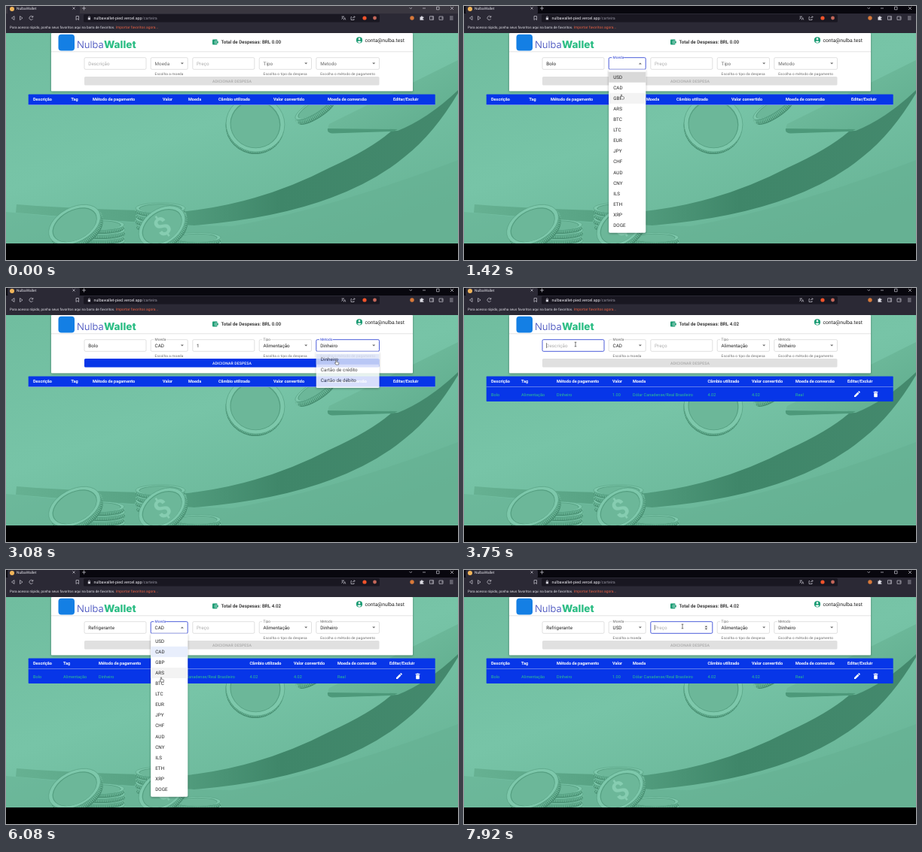
An HTML page that plays this animation: 600 by 338 pixels, repeating every 8000 ms.

```html
<!DOCTYPE html>
<html lang="pt-BR">
<head>
<meta charset="utf-8">
<title>NulbaWallet</title>
<style>
html, body { margin: 0; width: 100%; height: 100%; overflow: hidden; background: #000; }
svg { display: block; width: 100vw; height: 100vh; }
text { font-family: Roboto, sans-serif; text-rendering: geometricPrecision; white-space: pre; }
.icon { fill: none; stroke: #c9c8d2; stroke-width: .7; }
</style>
</head>
<body>
<svg viewBox="0 0 600 338">
  <defs>
    <linearGradient id="sky" x2=".7" y2="1">
      <stop offset="0" stop-color="#70bd9f"/><stop offset=".5" stop-color="#77c4a7"/><stop offset="1" stop-color="#68b496"/>
    </linearGradient>
    <linearGradient id="shaft" x2="1">
      <stop offset="0" stop-color="#66b192"/><stop offset=".35" stop-color="#549f80"/>
      <stop offset=".6" stop-color="#3f8669"/><stop offset="1" stop-color="#44896d"/>
    </linearGradient>
    <linearGradient id="head" y2="1">
      <stop offset="0" stop-color="#77c2a4"/><stop offset="1" stop-color="#5fac8d"/>
    </linearGradient>
    <clipPath id="page"><rect y="36" width="600" height="280"/></clipPath>
    <filter id="lift" x="-10%" y="-10%" width="120%" height="125%">
      <feDropShadow dx="0" dy="1" stdDeviation="1.4" flood-opacity=".35"/>
    </filter>
  </defs>
  <g id="backdrop" clip-path="url(#page)"></g>
  <rect id="strip" width="600" height="10"/>
  <g id="browser"></g>
  <g id="app"></g>
  <g id="pointer"></g>
</svg>
<script>
const LOOP = 8000, BLUE = '#0736e8', FOCUS = '#2b3fd2';
const $ = id => document.getElementById(id);

const text = (x, y, s, size = 6.25, fill = '#222', more = '') =>
  `<text x="${x}" y="${y}" font-size="${size}" fill="${fill}" ${more}>${s}</text>`;
const rect = (x, y, w, h, fill, more = '') =>
  `<rect x="${x}" y="${y}" width="${w}" height="${h}" fill="${fill}" ${more}/>`;
const path = (d, fill, more = '') => `<path d="${d}" fill="${fill}" ${more}/>`;
const dot = (x, y, r, fill) => `<circle cx="${x}" cy="${y}" r="${r}" fill="${fill}"/>`;
const icon = d => `<path class="icon" d="${d}"/>`;

// ---------- backdrop ----------
function coin(x, y, rx, ry, tilt, depth, mark = '') {
  const disc = (dy, k, fill, more = '') => `<ellipse cy="${dy}" rx="${rx * k}" ry="${ry * k}" fill="${fill}" ${more}/>`;
  return `<g transform="translate(${x} ${y}) rotate(${tilt})">` +
    disc(depth, 1, '#468d70') +
    disc(depth / 2, .98, '#549f81', `stroke="#6db899" stroke-width="${depth * .7}" stroke-dasharray="1.2 1.2"`) +
    disc(0, 1, '#7dc8ab', 'stroke="#569f82" stroke-width=".6"') +
    disc(.3, .86, '#559f81') + disc(.8, .83, '#6cb799') +
    text(0, ry * .55, mark, ry * 1.5, '#86cdb1', 'text-anchor="middle" font-weight="700"') + '</g>';
}
function stack(x, y, rx, ry, count) {
  let out = '';
  for (let i = count; i--;) out += coin(x + (i % 2), y + i * 7, rx, ry, 0, 5);
  return out;
}
$('backdrop').innerHTML =
  rect(0, 36, 600, 281, 'url(#sky)') +
  path('M0 274Q180 292 300 293Q430 270 600 205V317H0Z', '#64b092', 'opacity=".5"') +
  path('M14 264Q120 272 240 273Q340 262 430 215Q485 190 512 166L600 100V116Q568 170 530 200Q440 276 250 292Q150 287 13 275Z', 'url(#shaft)') +
  path('M429 157L600 72V112Q560 150 520 166L433 169Q425 166 429 157Z', 'url(#head)') +
  path('M427 163Q426 169 433 169.5L514 167L520 164Z', '#4d997a') +
  coin(331, 157, 39, 37, 12, 3) + coin(408, 135, 28, 8, -32, 8) +
  stack(205, 269, 33, 7, 4) + stack(254, 308, 31, 6.5, 2) +
  stack(125, 291, 32, 7, 4) + coin(91, 291, 37, 23, -28, 7) + coin(207, 293, 34, 23, -35, 6, '$');

// ---------- browser window ----------
$('browser').innerHTML =
  rect(0, 10, 600, 26, '#2b2935') +
  rect(2, 0, 96, 10, '#2b2935', 'rx="1.5"') + rect(103, 11, 393, 10.5, '#191721', 'rx="1.6"') +
  dot(8, 4, 3, '#f0b45a') + text(14, 5.2, 'NulbaWallet', 4.9, '#e6e5ec') +
  icon('M88.5 1.5l3 3m0-3l-3 3M101 3h5m-2.5-2.5v5') +
  icon('M535.5 2l1.7 1.7L539 2M553 3h4M571.5 1.2h3.6v3.6h-3.6zM590 1l4 4m0-4l-4 4') +
  icon('M11 13.5L7.5 16l3.5 2.5zM18.5 13.5L22 16l-3.5 2.5z') +
  icon('M35.5 14.5a2.5 2.5 0 1 0 .2 2.5M35.8 13v2h-2M93 13.5h3.5v5L94.7 17 93 18.5z') +
  rect(108.8, 15.5, 3.2, 2.8, '#d5d4dd') + icon('M109.5 15.5v-1a1 1 0 0 1 1.9 0v1') +
  text(116.5, 17.8, 'nulbawallet-pied.vercel.app<tspan fill="#8f8d9b">/carteira</tspan>', 5.3, '#eeedf3') +
  icon('M445.5 14h3.5m-1.8 0v1c0 1-1 2-1.8 2.5m.5-2l2 2m.5 1l1.2-3 1.2 3') +
  icon('M459 14.5h-1v4h4v-1.5M460 16.5q.5-2 3-2m-1-1.2l1.2 1.2-1.2 1.2') +
  dot(476, 16, 2.6, '#f0532b') + dot(489.5, 16, 2.4, '#c4675a') + dot(539, 16, 2.7, '#d8793a') +
  path('M549.5 14.5h1.5v-1h1.7v1h1.7v1.6h-1v1.4h1v1.3h-4.9z', '#dddce4') +
  icon('M562.5 13.7h5v4.6h-5zM566 13.7v4.6M575 14h5v4.3h-5zM578 16h2M561 14h0M589 14h4.5m-4.5 2h4.5m-4.5 2h4.5') +
  text(5, 30.4, 'Para acesso rápido, ponha seus favoritos aqui na barra de favoritos.', 4.64, '#e2e1e8') +
  text(145.7, 30.4, 'Importar favoritos agora...', 4.88, '#ea6043') +
  rect(0, 316, 600, 22, '#000');

// ---------- timeline ----------
const last = (track, t) => track.filter(k => k[0] <= t).pop();
const typed = (word, start, step) => [...word].map((c, i) => [start + i * step, word.slice(0, i + 1)]);

const ACTIVATED = 480, ADDED = 3420;
const values = {
  desc: [[0, ''], ...typed('Bolo', 720, 85), [ADDED, ''], ...typed('Refrigerante', 4240, 60)],
  coin: [[0, ''], [1660, 'CAD'], [7600, 'USD']],
  price: [[0, ''], [2100, '1'], [ADDED, '']],
  tag: [[0, ''], [2560, 'Alimentação']],
  method: [[0, ''], [3050, 'Dinheiro']]
};
const focusTrack = [[0, ''], [ACTIVATED, 'desc'], [1170, 'coin'], [1920, 'price'], [2240, 'tag'],
  [2790, 'method'], [3250, ''], [3660, 'desc'], [5200, ''], [5480, 'coin'], [7800, 'price']];
const menus = [['coin', 1170, 1660], ['tag', 2240, 2560], ['method', 2790, 3050], ['coin', 5480, 7600]];
const route = [[0, 330, 345], [430, 150, 76], [1000, 150, 76], [1160, 217, 77], [1420, 209, 118], [1600, 208, 109],
  [1680, 208, 109], [1900, 280, 77], [2110, 282, 77], [2230, 365, 78], [2450, 367, 98], [2600, 367, 98],
  [2780, 450, 78], [3000, 440, 96], [3070, 440, 96], [3240, 300, 100], [3430, 300, 100], [3650, 148, 75],
  [4950, 148, 75], [5250, 220, 65], [5460, 215, 77], [5800, 209, 115], [6080, 206, 143], [6600, 206, 165],
  [7000, 206, 235], [7450, 206, 150], [7570, 205, 97], [7620, 205, 97], [7810, 288, 75.5], [7920, 290, 75]];

const fields = {
  desc: { x: 104, w: 82, label: 'Descrição' },
  coin: { x: 192.2, w: 49, label: 'Moeda', hint: 'Escolha a moeda', notch: 16,
    options: 'USD CAD GBP ARS BTC LTC EUR JPY CHF AUD CNY ILS ETH XRP DOGE'.split(' ') },
  price: { x: 247.8, w: 82, label: 'Preço' },
  tag: { x: 336.2, w: 69.3, label: 'Tipo', hint: 'Escolha o tipo da despesa', notch: 11,
    options: ['Alimentação', 'Lazer', 'Trabalho', 'Transporte', 'Saúde'] },
  method: { x: 411.8, w: 83.7, label: 'Metodo', hint: 'Escolha o método de pagamento', notch: 18,
    options: ['Dinheiro', 'Cartão de crédito', 'Cartão de débito'] }
};
const TOP = 68.7, HIGH = 15.6, ITEM = 14.06, FIRST = 87.7;

function pointerAt(t) {
  const i = route.findIndex(k => k[0] > t);
  if (i < 0) return route[route.length - 1].slice(1);
  const [t0, x0, y0] = route[i - 1], [t1, x1, y1] = route[i];
  const p = (t - t0) / (t1 - t0), e = p * p * (3 - 2 * p);
  return [x0 + (x1 - x0) * e, y0 + (y1 - y0) * e];
}
const over = (f, [x, y]) => x > f.x && x < f.x + f.w && y > TOP && y < TOP + HIGH;

// ---------- app ----------
function field(name, t, open, pos) {
  const f = fields[name], value = last(values[name], t)[1];
  const [since, focus] = last(focusTrack, t), active = focus === name;
  const hot = over(f, pos), stroke = active ? FOCUS : hot ? '#333' : '#c0c0c0';
  let out = rect(f.x, TOP, f.w, HIGH, '#fff', `rx="1.6" stroke="${stroke}" stroke-width="${active ? .85 : .5}"`);
  if (f.options) {
    if (value || active) {
      out += rect(f.x + 4, TOP - 1, f.notch, 2, '#fff') +
        text(f.x + 5.4, 70.3, f.label, 4.69, active ? FOCUS : '#666', 'letter-spacing=".04"') + text(f.x + 5.4, 78.8, value);
    } else out += text(f.x + 5.4, 78.8, f.label, 6.25, '#666', 'letter-spacing=".06"');
    const x = f.x + f.w - 7.3, flip = open ? -1 : 1;
    out += path(`M${x - 2} ${76.6 - flip}h4l-2 ${2 * flip}z`, '#666') +
      text(f.x + 5.4, 91.6, f.hint, 4.69, '#666', 'letter-spacing=".14"');
  } else {
    out += text(f.x + 5.3, 78.8, value || f.label, 6.25, value ? '#222' : '#aaa', 'letter-spacing=".06"');
    if (active && !value && (t - since) % 1000 < 500) out += rect(f.x + 5, 73, .5, 7, '#222');
    if (name === 'price' && hot)
      out += rect(319.2, 73.3, 4.4, 6.8, '#efefef') + path('M320 76l1.4-1.8 1.4 1.8zM320 77.6l1.4 1.8 1.4-1.8z', '#444');
  }
  return out;
}

function menu(name, t, start, end, [px, py]) {
  const f = fields[name], alpha = Math.min(1, (t - start) / 130, 1 - (t - end) / 200);
  const value = last(values[name], t)[1];
  const row = px > f.x && px < f.x + f.w ? Math.floor((py - FIRST) / ITEM) : -1;
  let out = rect(f.x, 84.6, f.w, f.options.length * ITEM + 6.2, '#fff', 'rx="1.6" filter="url(#lift)"');
  f.options.forEach((s, i) => {
    const y = FIRST + i * ITEM;
    const fill = s === value ? (i === row ? '#dce3f8' : '#e8eefc') : !value && !i ? '#d9d9d9' : i === row ? '#f3f3f3' : '';
    if (fill) out += rect(f.x, y, f.w, ITEM, fill);
    out += text(f.x + 6, y + 9.3, s, 6.25, '#222', 'letter-spacing=".06"');
  });
  return `<g opacity="${alpha.toFixed(2)}">${out}</g>`;
}

const titles = ['Descrição', 'Tag', 'Método de pagamento', 'Valor', 'Moeda', 'Câmbio utilizado',
  'Valor convertido', 'Moeda de conversão', 'Editar/Excluir'];
const expense = ['Bolo', 'Alimentação', 'Dinheiro', '1.00', 'Dólar Canadense/Real Brasileiro', '4.02', '4.02', 'Real'];
const emptyColumns = [36, 86.5, 115, 208, 242, 282, 355, 427, 514];
const filledColumns = [36, 76, 123, 197, 224, 323.5, 382, 440, 509];

function table(filled) {
  const columns = filled ? filledColumns : emptyColumns;
  let out = rect(29.7, 117.4, 540, filled ? 33.6 : 14.4, BLUE, 'rx=".8"') + rect(29.7, 131.4, 540, .5, '#b9c4ee');
  titles.forEach((s, i) => out += text(columns[i], 126.4, s, 5.47, '#fff',
    'font-weight="500" letter-spacing=".05" stroke="#fff" stroke-width=".12"'));
  if (filled) {
    expense.forEach((s, i) => out += text(columns[i], 143.6, s, 5.47, '#2fc48f', 'letter-spacing=".05"'));
    out += path('M518 143.2l4.6-4.6 1.8 1.8-4.6 4.6H518zM523.1 138.1l.8-.8q.4-.3.8 0l1 1q.3.4 0 .8l-.8.8z', '#fff') +
      path('M544.2 139.6h4.6v5q0 .7-.7.7h-3.2q-.7 0-.7-.7zM543.6 138h1.6l.5-.6h1.6l.5.6h1.6v.9h-5.8z', '#fff');
  }
  return out;
}

function header(total) {
  return rect(60, 36, 480, 77.3, '#fff', 'rx="1" filter="url(#lift)"') +
    rect(60, 60.3, 480, .5, '#d2d2d2') + rect(60, 60.8, 480, .7, '#eee') +
    rect(69.5, 37.8, 21.5, 21.7, '#147fe4', 'rx="4"') +
    text(94, 56, 'Nulba', 13, '#3440b8', 'font-weight="300" style="font-family:Inter,sans-serif"') +
    text(130, 56, 'Wallet', 13.6, '#2bbd84', 'font-weight="800" style="font-family:Inter,sans-serif"') +
    rect(274, 44.6, 6.5, 7, '#1c9c74', 'rx="1"') + rect(277, 46.6, 5, 3.2, '#1c9c74', 'rx=".7" stroke="#fff" stroke-width=".5"') +
    dot(279, 48.2, .6, '#fff') +
    text(285.5, 50.4, 'Total de Despesas: BRL ' + total, 6.25, '#222', 'font-weight="500"') +
    dot(469, 45.4, 4.1, '#1c9c74') + dot(469, 43.9, 1.3, '#fff') + path('M466.4 47.6q2.6-2.2 5.2 0q-2.6 2.8-5.2 0z', '#fff') +
    text(476.5, 48.2, 'conta@nulba.test', 6.7, '#222');
}

function cursor(pos, shown) {
  const [x, y] = pos, line = 'stroke="#222" stroke-width=".5" stroke-linejoin="round"';
  const at = s => `<g transform="translate(${x.toFixed(2)} ${y.toFixed(2)})">${s}</g>`;
  if (!shown && (over(fields.desc, pos) || over(fields.price, pos)))
    return at('<path d="M-1.3-2.8h2.6M0-2.8v5.6M-1.3 2.8h2.6" fill="none" stroke="#222" stroke-width=".6"/>');
  const clickable = shown || ['coin', 'tag', 'method'].some(n => over(fields[n], pos)) || (x > 104 && y > 94 && y < 105);
  return at(clickable
    ? path('M-.6 0q.6-.7 1.2 0v2.4l2.5.6q.6.2.5.8l-.5 2.2H-.4L-2 3.6q.4-.8 1.4.2z', '#fff', line)
    : path('M0 0v5.2l1.2-1.1.9 2 .9-.4-.9-1.9h1.7z', '#fff', line));
}

let drawn = '';
function frame(now) {
  const t = now % LOOP, pos = pointerAt(t), filled = t >= ADDED;
  const current = menus.find(([, a, b]) => t >= a && t < b + 200);
  const opened = current && t < current[2] ? current[0] : '';
  const ready = t >= 3050 && !filled;
  const markup = header(filled ? '4.02' : '0.00') +
    Object.keys(fields).map(n => field(n, t, n === opened, pos)).join('') +
    rect(104, 94, 391.5, 11.6, ready ? BLUE : '#e0e0e0', 'rx="1.6"') +
    text(300, 101.6, 'ADICIONAR DESPESA', 5.08, ready ? '#fff' : '#a8a8a8', 'text-anchor="middle" font-weight="500" letter-spacing=".145"') +
    table(filled) + (current ? menu(...[current[0], t, current[1], current[2], pos]) : '');
  if (markup !== drawn) $('app').innerHTML = drawn = markup;
  // The window title strip is paler until the window is clicked.
  $('strip').setAttribute('fill', t < ACTIVATED ? '#3a3740' : '#08070e');
  $('pointer').innerHTML = pos[1] < 315 ? cursor(pos, !!opened) : '';
  requestAnimationFrame(frame);
}
requestAnimationFrame(frame);
</script>
</body>
</html>
```
